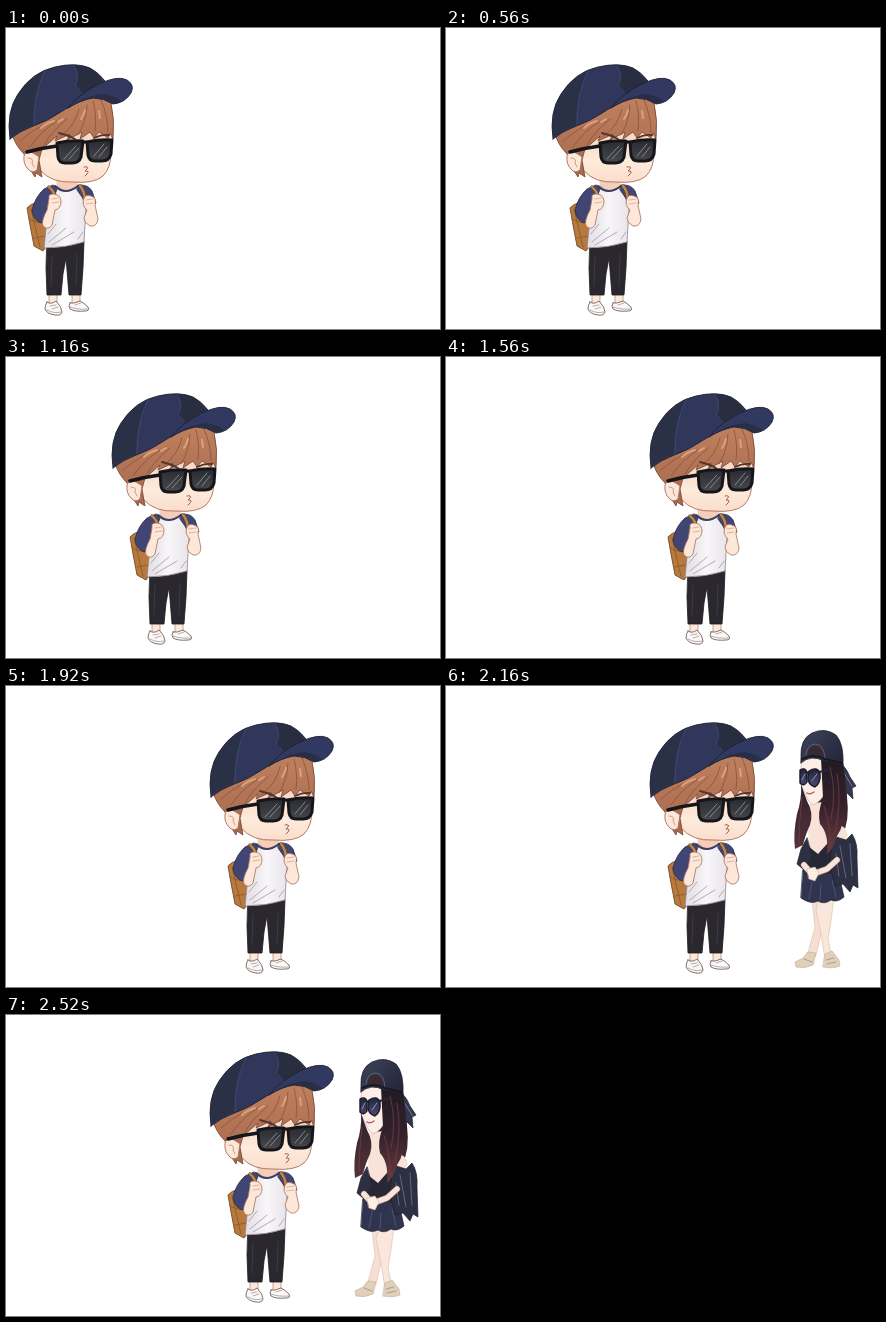
An HTML page with a canvas that plays this animation: 434 by 301 pixels, repeating every 2.76 s.

```html
<!DOCTYPE html>
<html lang="en">
<head>
<meta charset="utf-8">
<title>Walk and meet</title>
<style>
  html, body { margin: 0; width: 100%; height: 100%; overflow: hidden; background: #fff; }
  canvas { display: block; }
</style>
</head>
<body>
<canvas id="stage" width="434" height="301"></canvas>
<script>
const ctx = document.getElementById('stage').getContext('2d');
const LOOP = 2760;

function fill(color, d) {
  ctx.fillStyle = color;
  ctx.fill(new Path2D(d));
}

function line(color, width, d) {
  ctx.strokeStyle = color;
  ctx.lineWidth = width;
  ctx.stroke(new Path2D(d));
}

function shape(color, edge, width, d) {
  fill(color, d);
  line(edge, width, d);
}

function fade(x0, y0, x1, y1, ...colors) {
  const g = ctx.createLinearGradient(x0, y0, x1, y1);
  colors.forEach((c, i) => g.addColorStop(i / (colors.length - 1), c));
  return g;
}

const SKIN = '#fde7d8', SKIN_EDGE = '#a8705c', INK = '#20222f';

function boyBody() {
  // Backpack
  shape('#b87a3c', '#74492a', 0.9, 'M32 174Q24 176 21 180L24 197L28 218L37 223L43 215L42 190Z');
  line('#87552d', 0.8, 'M25 181L34 219M23 191Q32 196 39 194M28 210L39 208');

  // Ankles and shoes
  fill(SKIN, 'M43 266H51V277H43ZM66 266H74V276H66Z');
  line(SKIN_EDGE, 0.6, 'M43 267V276M51 267V275M66 267V276M74 267V274');
  shape('#fbf8f5', '#6f6264', 0.9, 'M41 274Q45 277 50 273Q56 279 56 284Q55 288 49 287Q41 286 39 281Q39 277 41 274Z');
  shape('#fbf8f5', '#6f6264', 0.9, 'M64 275Q68 276 74 273Q78 275 82 279Q84 283 79 283Q69 284 64 281Q62 278 64 275Z');
  line('#9b8c8c', 0.7, 'M41 282Q48 286 55 284M44 278L50 277M46 281L52 279M64 279Q72 282 82 281M69 277L75 275');

  // Trousers
  shape('#2a282e', '#1b1a20', 0.8, 'M41 218L78 213L77 240L75 267H63L60 230L57 246L55 267H41L40 240Z');
  line('#46434b', 0.7, 'M46 228L45 258M71 226L70 258');

  // Neck and shirt
  fill('#f6cdb6', 'M50 149H72L71 163L61 166L51 161Z');
  shape(fade(40, 0, 80, 0, '#e4e0e6', '#f8f6f8', '#e9e4ea'), '#8d8088', 0.8,
    'M44 160L51 158Q60 167 71 159L77 161L80 180L78 214Q59 220 38 220L41 190Z');
  line('#aaa3ad', 0.9, 'M43 214L60 200M46 217L68 204M42 206L50 196M72 211L77 204');
  line('#3a3d64', 2, 'M49 158Q59 168 72 158');

  // Sleeves and straps
  shape('#414574', '#292b48', 0.8, 'M47 157L38 161Q29 169 26 182Q27 192 35 195L42 190L47 172L51 161Z');
  shape('#414574', '#292b48', 0.8, 'M72 157Q82 156 86 163L90 175L81 179L76 169L71 162Z');
  for (const [color, width] of [['#74492a', 3.4], ['#c68a48', 2.2]]) {
    line(color, width, 'M43 159Q48 163 50 171M74 158Q79 163 79 174');
  }

  // Forearms with fists
  shape(SKIN, SKIN_EDGE, 0.8, 'M43 170Q42 166 47 166Q54 166 55 173Q55 181 49 182L46 197Q42 203 37 198Q35 193 41 182Z');
  shape(SKIN, SKIN_EDGE, 0.8, 'M78 170Q80 166 85 168Q91 169 89 177L92 191Q91 199 84 198Q78 195 78 190L81 182Q75 177 78 170Z');
  line('#cd9d88', 0.7, 'M46 171L52 170M46 175L53 174M80 172L87 171M80 176L87 175');
}

function boyFace() {
  shape(fade(0, 110, 0, 156, '#fbd9c4', '#fdebdc', '#fbdcca'), SKIN_EDGE, 0.9,
    'M23 101Q61 87 107 104L105 124Q105 140 97 148Q88 156 66 154Q46 155 35 143L25 132Z');
  line('#9a6056', 1, 'M78 139Q83 138 81 141L79 143Q84 143 81 146L79 148');
}

function boyHair() {
  shape(fade(0, 75, 0, 145, '#bd7e5d', '#a8694d'), '#704334', 0.8,
    'M6 106Q25 85 65 68Q92 60 105 75Q109 92 107 111L104 105L102 110L93 104L88 110L84 104'
    + 'L74 111L76 104L61 112L64 106L49 113L51 108L36 121L33 132L36 149L30 145L29 149Q25 144 22 136L18 126Q9 117 6 106Z');
  line('#87533f', 0.8, 'M14 113Q24 104 37 97M24 119Q34 104 51 93M38 117Q45 104 61 91M55 108Q69 98 73 81M72 107Q80 95 81 77M89 103Q91 88 87 73M102 104Q102 88 95 72');
  line('#dca17c', 2, 'M35 100Q40 95 48 93M52 94L57 91M75 91Q78 87 79 82M94 90L93 83');
  // Ear
  shape(SKIN, SKIN_EDGE, 0.9, 'M27 125Q20 121 18 128Q17 136 22 141Q26 146 31 142L33 129Z');
  line('#c08871', 0.8, 'M22 130Q28 130 26 135L28 139');
  // Brows
  line('#54342c', 1.8, 'M53 105Q62 107 69 111M88 110Q96 106 103 107');
}

function boyGlasses() {
  line('#15161b', 3.6, 'M21 124Q35 120 51 118');
  line('#15161b', 3.2, 'M75 115Q79 113 83 115');
  const left = 'M51 115Q64 112 77 113L75 129Q73 135 66 135H59Q53 135 52 129Z';
  const right = 'M81 114Q94 111 106 112L105 126Q103 133 96 133H89Q83 133 82 127Z';
  for (const lens of [left, right]) {
    shape(fade(0, 114, 0, 136, '#2b2d33', '#494b50'), '#15161b', 3, lens);
  }
  line('#85878c', 1, 'M58 131L70 118M63 131L73 120M88 128L98 116M93 129L101 119');
}

function boyCap() {
  shape('#30375a', INK, 0.9,
    'M4 111Q0 84 12 66Q26 44 49 39Q70 34 84 40Q92 44 99 53L96 66Q76 70 58 82Q42 93 25 99Q14 103 4 111Z');
  fill('#2a3045', 'M5 109Q1 85 12 67Q22 51 38 44Q27 65 27 97Q14 102 5 109Z');
  fill('#282d40', 'M68 38Q79 37 86 42Q93 47 97 54L77 65L70 57Q75 46 68 38Z');
  line('#454d72', 0.7, 'M39 43Q28 64 28 97M68 38Q75 48 69 58');
  // Brim
  shape('#323961', INK, 0.9,
    'M62 80Q73 66 93 56Q112 47 121 52Q129 57 125 65Q119 75 107 76Q98 70 87 70Q75 72 62 80Z');
  fill('#292e47', 'M64 79Q80 67 98 66Q109 68 115 73Q110 76 107 76Q98 70 87 70Q75 72 64 79Z');
}

function boy(x) {
  ctx.save();
  ctx.translate(x, 0);
  boyBody();
  boyFace();
  boyHair();
  boyGlasses();
  boyCap();
  ctx.restore();
}

function girl() {
  // Legs and shoes
  shape('#f6dfd2', '#ddb8a8', 0.6, 'M366 211H377L379 231L370 269L365 275L361 271L369 241Z');
  shape('#fae7dc', '#ddb8a8', 0.6, 'M374 211H388L385 235L382 253L386 272L379 273L375 248L370 224Z');
  shape('#e0cfb9', '#c3ab95', 0.6, 'M362 266L370 267L367 279Q359 283 350 281L349 276L357 272Z');
  shape('#e0cfb9', '#c3ab95', 0.6, 'M379 268L386 265L393 274L394 280Q387 283 377 281Z');
  line('#a38d7a', 0.8, 'M358 273L366 276M380 274L388 272M381 278L390 276');

  // Back hair and cap tie
  fill(fade(0, 70, 0, 172, '#211b24', '#38222a', '#63393b'),
    'M376 70L395 71Q401 86 401 111Q404 135 396 150Q394 164 386 170L374 160L366 140Z');
  shape('#33364d', '#20222f', 0.7, 'M395 78Q400 81 404 91L410 100L406 102L407 113L399 105L395 91Z');
  line('#8b8ca1', 0.8, 'M398 87L406 100');

  // Chest, jacket and skirt
  fill('#f9e2d7', 'M361 118L377 116L380 142L391 138Q400 140 402 149L397 160L372 172L363 165Z');
  shape('#30344e', '#20222f', 0.7, 'M357 184L391 180L398 211Q391 217 385 214Q378 219 372 215Q365 219 355 212Z');
  line('#535871', 0.9, 'M366 196L363 213M375 198L374 214M386 194L390 211');
  fill('#262835', 'M362 160L372 168L388 150L392 187L360 188Z');
  shape('#2d3043', '#20222f', 0.7, 'M387 150L400 154L406 148Q412 157 411 172L412 202L407 199L404 206L397 198L389 200L384 178Z');
  shape('#2d3043', '#20222f', 0.7, 'M361 152L355 163L351 178L358 184L366 171Z');
  line('#686c83', 0.9, 'M394 160L400 192M404 158L406 190M390 168L393 190');

  // Arms
  line('#d3a99a', 6.2, 'M358 179L365 187M391 174L381 183L367 188');
  line('#fae5da', 5, 'M358 179L365 187M391 174L381 183L367 188');
  shape('#fdeee6', '#d3a99a', 0.6, 'M361 183L369 181L373 187L369 195L363 193Z');

  // Face
  shape('#fdeee8', '#cbaaa4', 0.6, 'M357 69Q367 62 380 73L380 105Q375 116 367 119Q361 115 359 107L355 100L354 89Z');
  line('#b85f68', 1.5, 'M361 107Q364 109 368 106');

  // Front hair
  fill(fade(0, 70, 0, 168, '#201a23', '#33202a', '#6b3d3f'),
    'M375 72Q389 66 397 79Q402 100 398 119Q399 139 391 150Q388 162 381 168Q383 148 374 138Q371 127 377 112Z');
  fill(fade(0, 95, 0, 165, '#2c2029', '#58333a'),
    'M355 98Q356 113 351 128Q347 147 349 163L357 159Q360 147 364 139Q368 127 361 115Z');
  line('#6d4146', 0.8, 'M384 81Q391 107 385 133M391 88Q396 115 389 147M378 120Q385 142 384 160M356 112Q353 136 353 157');

  // Glasses
  line('#24243a', 2, 'M373 86L382 84M359 87L366 86');
  const tint = fade(0, 82, 0, 101, '#20223a', '#4d4c76');
  shape(tint, '#1b1b29', 1.4, 'M354 84Q359 81 361 86L361 96Q358 101 354 97Z');
  shape(tint, '#1b1b29', 1.4, 'M363 85Q371 80 374 87Q375 97 369 101Q362 99 362 92Z');
  line('#9696bc', 1, 'M356 94L359 88M366 95L371 88');

  // Reversed cap
  shape(fade(358, 44, 394, 76, '#3e4259', '#24273a'), INK, 0.8,
    'M355 71Q354 53 366 47Q379 41 390 49Q398 58 397 79Q388 76 378 75Q365 68 355 77Z');
  fill('#3a2a30', 'M361 70Q362 60 369 60Q376 60 377 72Q369 67 361 70Z');
  line('#5d617a', 1, 'M360 69Q361 58 370 58Q378 59 379 72');
  line('#171923', 2, 'M356 73Q368 67 379 73L396 77');
}

function render(t) {
  ctx.fillStyle = '#fff';
  ctx.fillRect(0, 0, 434, 301);
  ctx.lineCap = ctx.lineJoin = 'round';
  boy(t < 560 ? 0 : t < 1560 ? 103 : 201);
  if (t >= 2160) girl();
}

const start = performance.now();
function tick() {
  render((performance.now() - start) % LOOP);
  requestAnimationFrame(tick);
}
tick();
</script>
</body>
</html>
```
